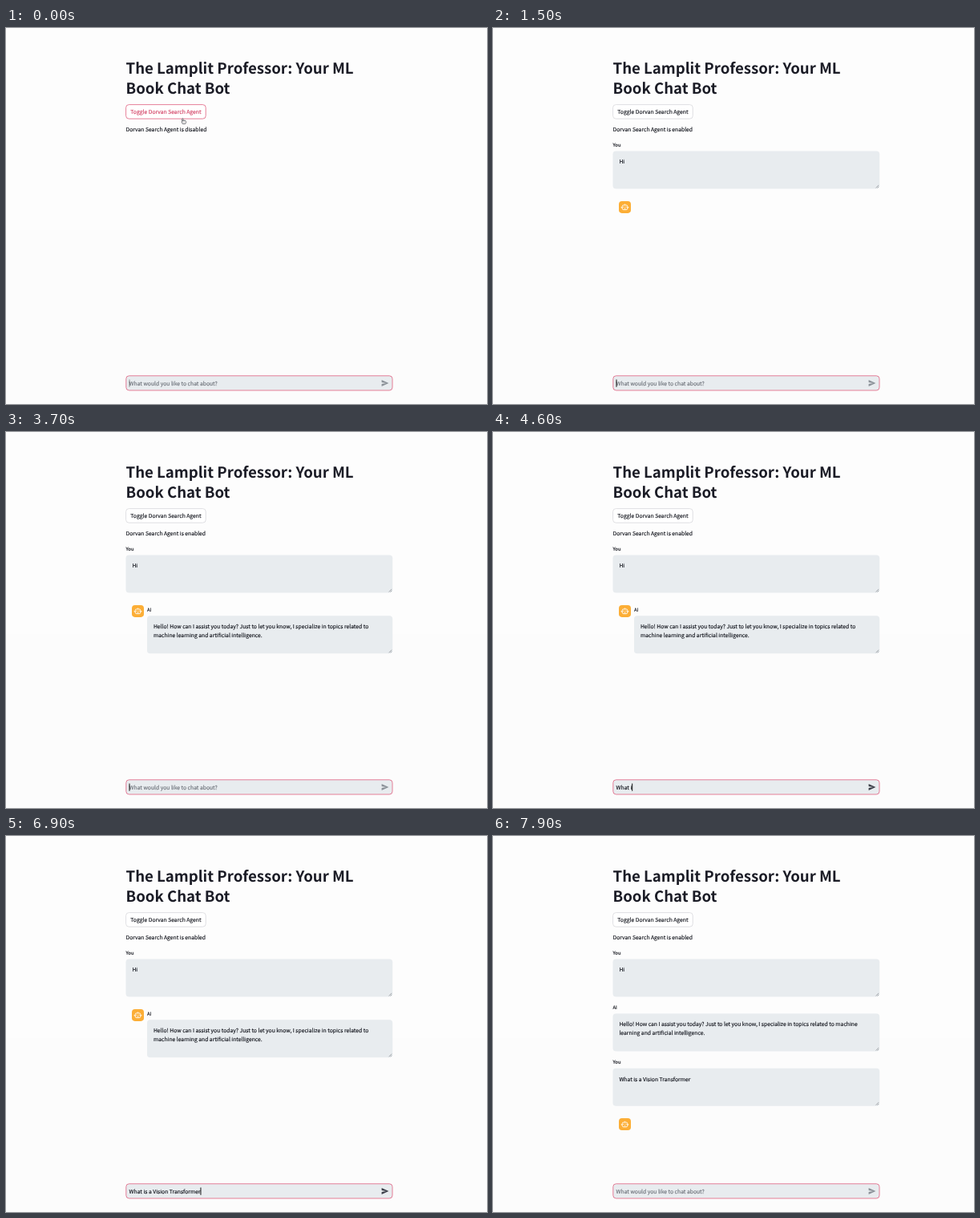
Recreate the animation shown at these times as an HTML page with a canvas. Size 600 by 469 pixels, loop 8 s.

```html
<!DOCTYPE html>
<html lang="en">
<head>
<meta charset="utf-8">
<title>Chat bot</title>
<style>
  html, body { margin: 0; width: 100%; height: 100%; overflow: hidden; background: #fcfcfc; }
  canvas { display: block; width: 600px; height: 469px; }
</style>
</head>
<body>
<canvas id="stage"></canvas>
<script>
const W = 600, H = 469, LOOP = 8000, STEP = 100;
const FONT = '"Noto Sans CJK JP", "Noto Sans CJK SC", "Noto Sans CJK", "Noto Sans", sans-serif';
const BODY = 6.77, LABEL = 5.92, TITLE = 18.62, LEADING = 10.6;
const INK = '#12141c', ROSE = '#e0607f', FIELD = '#e8ecef', ORANGE = '#fcae36';
const LEFT = 149.5, RIGHT = 482.2, BOX_H = 47, RADIUS = 3.8;

const CLICK = 100, ENABLED = 300, FOCUS = 900, SENT = 1400, REPLY = 2700, RESENT = 7100;
const GREETING = 'Hi', QUESTION = 'What is a Vision Transformer';
const ANSWER = 'Hello! How can I assist you today? Just to let you know, I specialize in topics ' +
  'related to machine learning and artificial intelligence.';
// Key points of [time, letters typed]: type, mistype, delete, finish
const TYPING = [[4100, 0], [4900, 10], [5000, 10], [5200, 15], [5300, 15], [5600, 10], [5700, 10], [6900, 28]];

const canvas = document.getElementById('stage');
const ctx = canvas.getContext('2d');
const scale = Math.max(1, window.devicePixelRatio || 1);
canvas.width = W * scale;
canvas.height = H * scale;

const clamp = v => Math.min(1, Math.max(0, v));
const progress = (t, from, to) => clamp((t - from) / (to - from));

function text(str, x, y, size = BODY, color = INK, weight = 400) {
  ctx.font = `${weight} ${size}px ${FONT}`;
  ctx.fillStyle = ctx.strokeStyle = color;
  ctx.fillText(str, x, y);
  // A hairline outline gives the slightly heavier look of small screen text
  if (weight < 700) {
    ctx.lineWidth = 0.15;
    ctx.strokeText(str, x, y);
  }
}

function paint(fill, stroke, line) {
  if (fill) { ctx.fillStyle = fill; ctx.fill(); }
  if (stroke) { ctx.strokeStyle = stroke; ctx.lineWidth = line; ctx.stroke(); }
}

function box(x, y, w, h, r, fill, stroke, line = 0.8) {
  ctx.beginPath();
  ctx.roundRect(x, y, w, h, r);
  paint(fill, stroke, line);
}

function poly(points, fill, stroke, line = 0.8) {
  ctx.beginPath();
  points.forEach(([x, y]) => ctx.lineTo(x, y));
  ctx.closePath();
  paint(fill, stroke, line);
}

function faded(alpha, draw) {
  ctx.save();
  ctx.globalAlpha = alpha;
  draw();
  ctx.restore();
}

function at(x, y, draw) {
  ctx.save();
  ctx.translate(x, y);
  draw();
  ctx.restore();
}

function wrap(str, width) {
  ctx.font = `400 ${BODY}px ${FONT}`;
  const lines = [''];
  for (const word of str.split(' ')) {
    const longer = `${lines.at(-1)} ${word}`.trim();
    if (ctx.measureText(longer).width > width) lines.push(word);
    else lines[lines.length - 1] = longer;
  }
  return lines;
}

function header(t) {
  text('The Lamplit Professor: Your ML', LEFT, 57.3, TITLE, '#1b1c26', 700);
  text('Book Chat Bot', LEFT, 82.2, TITLE, '#1b1c26', 700);

  const enabled = t >= ENABLED;
  const pressed = t >= CLICK && t < CLICK + STEP;
  const color = pressed ? '#fff' : enabled ? INK : '#d23f62';
  box(149.6, 95.6, 99.6, 17.6, RADIUS, pressed ? ROSE : '#fff', enabled ? '#d8d9dc' : ROSE);
  ctx.textAlign = 'center';
  text('Toggle Dorvan Search Agent', 199.4, 106.5, BODY, color);
  ctx.textAlign = 'left';
  text(`Dorvan Search Agent is ${enabled ? 'enabled' : 'disabled'}`, LEFT, 129.2);
}

function message(label, str, x, top) {
  const width = RIGHT - x;
  text(label, x, top - 5.5, LABEL);
  box(x, top, width, BOX_H, RADIUS, FIELD);
  wrap(str, width - 16).forEach((line, i) => text(line, x + 7.9, top + 15.8 + i * LEADING));

  const right = RIGHT - 1, bottom = top + BOX_H - 1;
  ctx.beginPath();
  for (const d of [3.6, 1.7]) {
    ctx.moveTo(right - d, bottom);
    ctx.lineTo(right, bottom - d);
  }
  paint(null, '#777b80', 0.6);
}

function avatar(top) {
  at(164.5, top + 7.5, () => {
    box(-7.5, -7.5, 15, 15, RADIUS, ORANGE);
    box(-3.2, -2.5, 6.4, 5.8, 1.5, null, '#fff', 0.9);
    box(-0.4, -4.1, 0.8, 1.6, 0.4, '#fff');
    box(-1.3, 1.4, 2.6, 0.6, 0.2, '#fff');
    for (const side of [-1, 1]) {
      box(side * 4.2 - 0.4, -0.6, 0.8, 2, 0.4, '#fff');
      box(side * 1.4 - 0.6, -0.8, 1.2, 1.2, 0.6, '#fff');
    }
  });
}

function chat(t) {
  const top = 153.5, gap = 68.1, iconGap = 62.4;
  if (t < SENT) return;
  message('You', GREETING, LEFT, top);
  if (t >= RESENT) {
    message('AI', ANSWER, LEFT, top + gap);
    message('You', QUESTION, LEFT, top + gap * 2);
    if (t > RESENT) avatar(top + gap * 2 + iconGap);
    return;
  }
  if (t > SENT) avatar(top + iconGap);
  if (t >= REPLY) {
    faded(0.4 + 0.6 * progress(t, REPLY, REPLY + 300), () => message('AI', ANSWER, 176, 229.3));
  }
}

function typed(t) {
  if (t < SENT) return GREETING.slice(0, 2 * progress(t, FOCUS, 1100));
  if (t >= RESENT) return '';
  let count = 0;
  TYPING.slice(1).forEach(([t1, n1], i) => {
    const [t0, n0] = TYPING[i];
    count += (n1 - n0) * progress(t, t0, t1);
  });
  return QUESTION.slice(0, Math.floor(count + 1e-6));
}

function caretAlpha(t, value) {
  if (t < FOCUS) return t < CLICK ? 0.45 : 0;
  if (value || t < SENT) return 1;
  const since = t < RESENT ? t - SENT : Math.max(0, t - RESENT - 200);
  // One-second blink that lingers at both ends of the fade
  const wave = Math.cos((since - 150) / 1000 * 2 * Math.PI);
  return Math.abs(wave) < 0.55 ? 0.45 : wave > 0 ? 1 : 0;
}

function input(t) {
  const focused = t < CLICK || t >= FOCUS;
  const value = typed(t);
  box(149.8, 433.8, 332.2, 18.2, RADIUS, FIELD, focused && ROSE);
  text(value || 'What would you like to chat about?', 153.6, 445.6, BODY, value ? INK : '#6c7179');

  const width = value ? ctx.measureText(value).width : 0;
  faded(caretAlpha(t, value), () => box(153.5 + width, 438.4, 1, 9.4, 0, '#111'));

  at(468.6, 443, () => poly(
    [[0, -4], [8.8, 0], [0, 4], [0, 0.9], [5.6, 0], [0, -0.9]],
    value ? '#3c3f49' : '#8b9198'
  ));
}

function mouse(t) {
  if (t >= FOCUS + STEP) return;
  const k = progress(t, 200, 800), u = k - 1;
  const travel = 1 + 2 * u ** 3 + u ** 2; // ease out, slightly past the end
  const x = 222 - 5 * k + 7 * Math.sin(Math.PI * k);
  const y = 116.3 + 330.7 * travel;
  const shape = y < 120 ? hand : y > 434 && y < 452 ? beam : arrow;
  at(x, y, shape);
}

function arrow() {
  poly([[-2, -4], [-2, 3], [0, 1.4], [3, 1.1]], '#222', '#fff', 0.5);
}

function hand() {
  const outline = '#44464c';
  box(-2.4, -3.4, 1.5, 5, 0.7, '#fff', outline, 0.7);
  box(-2.4, -0.9, 4.8, 4.2, 1.3, '#fff', outline, 0.7);
  for (const x of [-0.6, 0.6]) box(x, 0.3, 0.4, 1.7, 0, '#777');
}

function beam() {
  ctx.beginPath();
  for (const s of [-1, 1]) {
    ctx.moveTo(-1.5, 3.7 * s);
    ctx.quadraticCurveTo(0, 3.7 * s, 0, 2.6 * s);
    ctx.quadraticCurveTo(0, 3.7 * s, 1.5, 3.7 * s);
  }
  ctx.moveTo(0, -2.8);
  ctx.lineTo(0, 2.8);
  paint(null, '#222', 0.8);
}

function draw(t) {
  ctx.setTransform(scale, 0, 0, scale, 0, 0);
  ctx.textRendering = 'geometricPrecision';
  ctx.lineJoin = 'round';
  ctx.fillStyle = '#fdfdfd';
  ctx.fillRect(0, 0, W, 252);
  ctx.fillStyle = '#fcfcfc';
  ctx.fillRect(0, 252, W, H - 252);
  header(t);
  chat(t);
  input(t);
  mouse(t);
}

const start = performance.now();
function frame() {
  const t = (performance.now() - start) % LOOP;
  draw(Math.floor(t / STEP) * STEP);
  requestAnimationFrame(frame);
}
frame();
</script>
</body>
</html>
```
